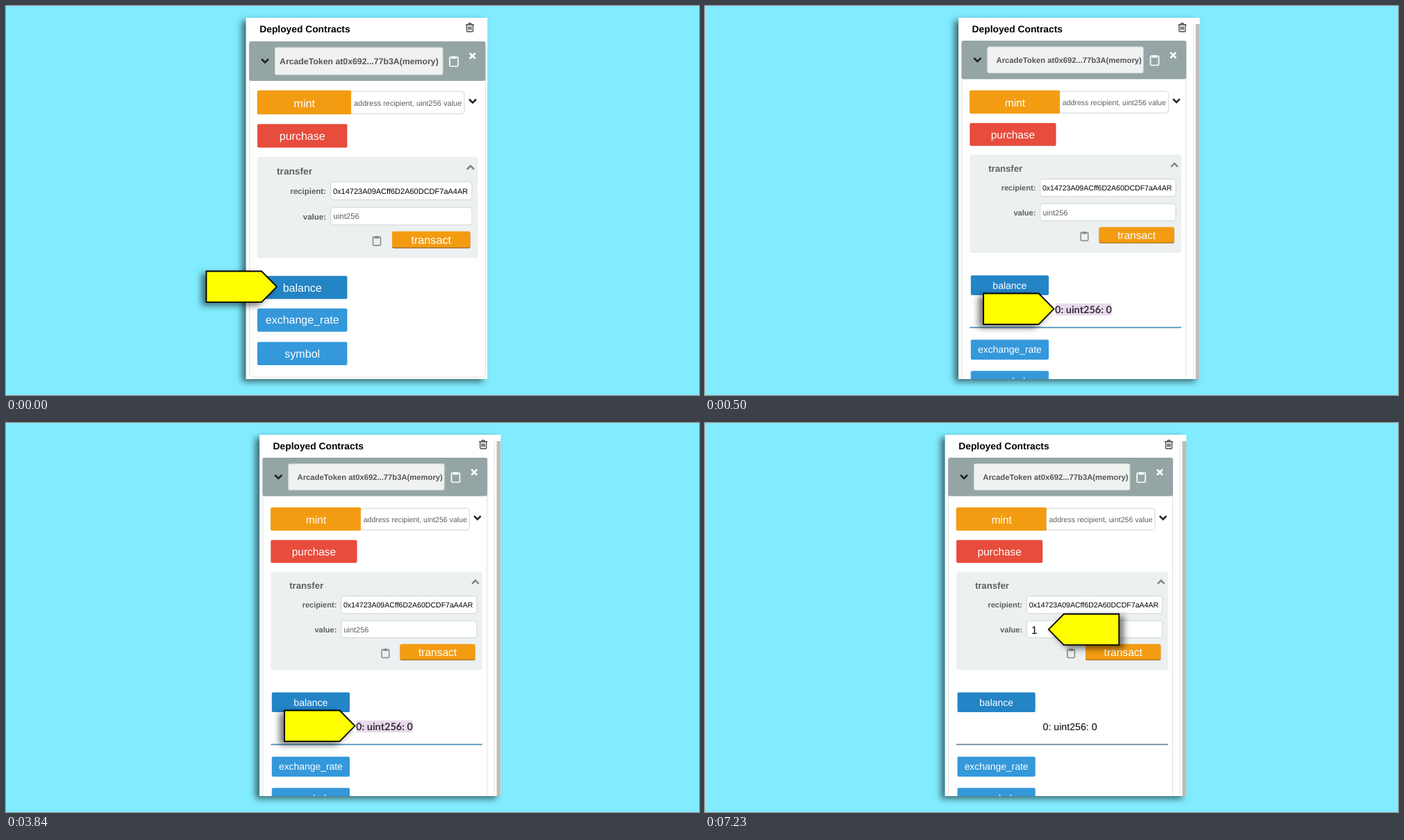
An HTML page for the animation above (8000 ms loop, 998 px wide and 561 px high).

```html
<!DOCTYPE html>
<html lang="en">
<head>
<meta charset="utf-8">
<title>Deployed contracts</title>
<style>
  html, body { margin: 0; width: 100%; height: 100%; overflow: hidden; background: #81ecff; }
  svg { display: block; width: 100%; height: 100%; }
  text { font-family: "Liberation Sans", Arial, sans-serif; text-rendering: geometricPrecision; }
</style>
</head>
<body>
<svg id="stage" viewBox="0 0 998 561" xmlns="http://www.w3.org/2000/svg"></svg>
<script>
const LOOP = 8000;
const CUTS = [0, 500, 6070];
const ORANGE = '#f39c12', RED = '#e74c3c', BLUE = '#3498db', DEEP_BLUE = '#2384c6';
const SLATE = '#95a5a6', GREY = '#5f5f5f', PALE = '#dee2e4';

const rect = (x, y, w, h, fill, r = 0, extra = '') =>
  `<rect x="${x}" y="${y}" width="${w}" height="${h}" rx="${r}" fill="${fill}" ${extra}/>`;
const text = (x, y, size, str, fill = '#000', extra = '') =>
  `<text x="${x}" y="${y}" font-size="${size}" fill="${fill}" ${extra}>${str}</text>`;
const line = (d, color, width) =>
  `<path d="${d}" fill="none" stroke="${color}" stroke-width="${width}"/>`;

const BOLD = 'font-weight="700"', MIDDLE = 'text-anchor="middle"', END = 'text-anchor="end"';

const button = (x, y, w, h, fill, label, size, base) =>
  rect(x, y, w, h, fill, 2) + text(x + w / 2, base, size, label, '#fff', MIDDLE);
const field = (x, y, w, h) =>
  rect(x + .5, y + .5, w - 1, h - 1, '#fff', 4, 'stroke="#cfd4d6"');
const chevron = (x, y, dir, color) =>
  line(`M${x - 5} ${y - 2.5 * dir}l5 ${5 * dir}l5 ${-5 * dir}`, color, 2.6);
const cross = (x, y) => line(`M${x - 4} ${y - 4}l8 8m0 -8l-8 8`, '#fff', 2.6);

const clipboard = (x, y, s, color) => `<g transform="translate(${x} ${y}) scale(${s})">
  <rect x="-6" y="-6" width="12" height="13.5" rx="1.5" fill="none" stroke="${color}" stroke-width="1.7"/>
  <path d="M-3.8 -3.4v-3.2h2.2a1.8 1.8 0 0 1 3.2 0h2.2v3.2z" fill="${color}"/></g>`;

const trash = (x, y) => `<g transform="translate(${x} ${y})" fill="none" stroke="#444" stroke-width="1.3">
  <path d="M-6 -4h12M-2.5 -4l1 -2h3l1 2M-4.5 -4v8.8q0 1.2 1.2 1.2h6.6q1.2 0 1.2 -1.2v-8.8M-2 -1.5v5M0 -1.5v5M2 -1.5v5"/></g>`;

const arrow = (x, y, dir = 1) =>
  `<path transform="translate(${x} ${y}) scale(${dir} 1)" d="M0 0l-22 -22.3h-79.5v44.6h79.5z"
    fill="#ff0" stroke="#000" stroke-width="1.8" filter="url(#shadow)"/>`;

function header({ y, w, h, boxW, labelX, labelSize, clipX, crossX, midY }) {
  return text(365.3, 38, 13.8, 'Deployed Contracts', '#000', BOLD) + trash(668, 31) +
    rect(350, y, w, h, SLATE, 3) +
    rect(387.5, y + 9, boxW, h - 18, '#f0f2f2', 2, 'stroke="#d9dddd"') +
    chevron(373, midY, 1, '#222') +
    text(labelX, midY + 4.6, labelSize, 'ArcadeToken at0x692...77b3A(memory)', '#555', BOLD) +
    clipboard(clipX, midY + .5, 1, '#fff') + cross(crossX, y + 21);
}

function form(value) {
  return rect(362, 122, 135, 34, ORANGE, 2, 'stroke="#e3900e" stroke-width=".6"') +
    field(496, 122.5, 164.5, 33.5) + rect(490, 122, 7, 34, ORANGE) +
    text(429.8, 145.6, 16.1, 'mint', '#fff', MIDDLE) +
    text(501, 143.6, 11, 'address recipient, uint256 value', GREY) +
    chevron(672, 137, 1, '#222') +
    button(362, 170.3, 129.4, 34, RED, 'purchase', 16, 193) +
    rect(362, 217.5, 317.5, 146, '#ecf0f1', 3) +
    text(390, 242.6, 13.7, 'transfer', GREY, BOLD) +
    chevron(669, 233, -1, '#858585') +
    text(461, 271, 11.5, 'recipient:', GREY, BOLD + END.padStart(END.length + 1)) +
    field(467, 253, 204.5, 27) +
    text(471, 271, 11, '0x14723A09ACff6D2A60DCDF7aA4AR') +
    text(461, 307.6, 11.5, 'value:', GREY, BOLD + ' ' + END) +
    field(467, 289.8, 204.5, 26.5) + value +
    clipboard(534, 338.5, .92, '#888') +
    rect(556, 326, 112.5, 23.4, '#a86f1c', 2) +
    button(556, 325, 112.5, 23, ORANGE, 'transact', 16.2, 342.6);
}

const panel = (dx, content) => `<g transform="translate(${dx} 0)">
  ${rect(345.8, 17, 347.4, 521, '#fff', 0, 'filter="url(#shadow)"')}
  <g clip-path="url(#panel)">${content}</g></g>`;

const hint = text(471.5, 307.4, 11.4, 'uint256', GREY);

const first = panel(0,
  rect(350.5, 100, 340, 435, '#fff', 4, `stroke="${PALE}"`) +
  header({ y: 51, w: 340.6, h: 57, boxW: 241.5, labelX: 394, labelSize: 12.3, clipX: 645, crossX: 671.8, midY: 79 }) +
  form(hint) +
  button(362, 389.2, 129.4, 33.3, DEEP_BLUE, 'balance', 16, 412) +
  button(362, 436.3, 129.4, 33.5, BLUE, 'exchange_rate', 16, 458.4) +
  button(362, 484.5, 129.4, 33.5, BLUE, 'symbol', 16.1, 507)
) + arrow(390, 404.8);

const expanded = (dx, value, result, rule) => panel(dx,
  rect(350.5, 100, 323, 460, '#fff', 4, `stroke="${PALE}"`) +
  line('M684 26V538', '#e4e4e4', 1) + rect(687.3, 26, 6, 512, '#bdbdbd') +
  header({ y: 50, w: 324, h: 55.6, boxW: 224.3, labelX: 400.3, labelSize: 11.25, clipX: 628.2, crossX: 655, midY: 77.5 }) +
  `<g transform="translate(362 122) scale(.96 .969) translate(-362 -122)">${form(value)}</g>` +
  button(363.5, 388.6, 112.2, 28.4, DEEP_BLUE, 'balance', 14, 408.2) + result +
  line('M362 463.6H666.6', rule, 1.6) +
  button(363.5, 481.3, 112.2, 28.6, BLUE, 'exchange_rate', 13.9, 500.2) +
  button(363.5, 526.2, 112.2, 28.6, BLUE, 'symbol', 14, 546));

const output = '0: uint256: 0';
const second = expanded(19.3, hint,
  rect(485.5, 429, 80.4, 17.3, '#ead9ee') +
  text(525.7, 443.2, 14.5, output, '#333', MIDDLE + ' font-weight="700" style="font-family:Lato,sans-serif"'),
  '#4c8fb9') + arrow(502.5, 436.8);
const third = expanded(0, text(474.5, 309.6, 16, '1'),
  text(486.5, 443, 14.2, output), '#66849a') + arrow(494.7, 297.8, -1);

const stage = document.getElementById('stage');
stage.innerHTML = `<defs>
  <filter id="shadow" x="-30%" y="-60%" width="160%" height="220%">
    <feDropShadow dx="-6" dy="4" stdDeviation="5" flood-color="#000" flood-opacity=".55"/>
  </filter>
  <clipPath id="panel"><rect x="345.8" y="17" width="347.4" height="521"/></clipPath>
</defs>` + [first, second, third].map(s => `<g class="scene">${s}</g>`).join('');

const scenes = [...stage.querySelectorAll('.scene')];
const start = performance.now();

function show() {
  const t = (performance.now() - start) % LOOP;
  const current = CUTS.filter(cut => cut <= t).length - 1;
  scenes.forEach((scene, i) => { scene.style.display = i === current ? '' : 'none'; });
  requestAnimationFrame(show);
}
show();
</script>
</body>
</html>
```
